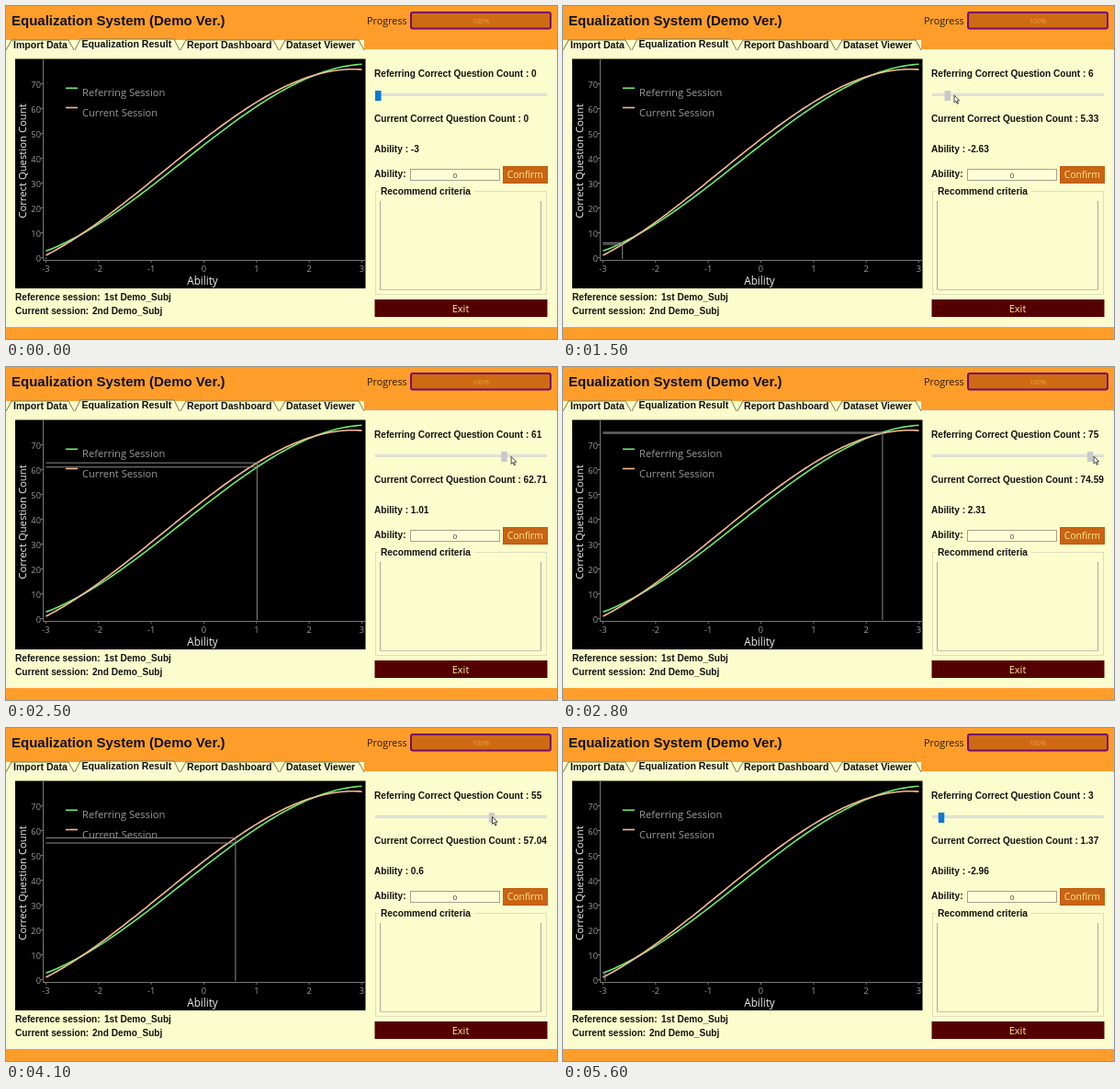
Animation, 600 px wide and 362 px high, one loop 5.7 s. Source, as an HTML page with a canvas:

```html
<!DOCTYPE html>
<html lang="en">
<head>
<meta charset="utf-8">
<title>Equalization System</title>
<style>
html, body { margin: 0; width: 100%; height: 100%; overflow: hidden; background: #fcfecb; }
canvas { display: block; }
</style>
</head>
<body>
<canvas id="stage" width="600" height="362"></canvas>
<script>
const ctx = document.getElementById('stage').getContext('2d');
const LOOP = 5700, STEP = 100;
const CREAM = '#fbfdcd', ORANGE = '#ff9d2b', GREEN = '#6cec6c', PEACH = '#f7bc92';
const bold = size => `bold ${size}px "Liberation Sans", Arial, sans-serif`;
const ui = size => `${size}px "Open Sans", "Noto Sans", sans-serif`;

// time, question count, pointer x, pointer y
const DRAG = [
  [1200, 0, 406, 97], [1500, 6, 426, 97], [2100, 43, 513, 98],
  [2800, 75, 578, 97], [3000, 80, 588, 96], [3600, 80, 593, 94],
  [3700, 80, 589, 94], [4500, 30, 470, 99], [5500, 3, 410, 99]
];

const cubic = (a, b, c, d) => x => a + x * (b + x * (c + x * d));
const referring = cubic(45.3206, 16.5084, -0.5639, -0.4418);
const current = cubic(47.6924, 16.36533, -1.041935, -0.433578);
const px = ability => 215.5 + 57.33 * ability;
const py = count => 273.5 - 2.7 * count;
const round2 = x => Math.round(x * 100) / 100;

function abilityFor(count) {
  let lo = -3, hi = 3;
  for (let i = 0; i < 30; i++) {
    const mid = (lo + hi) / 2;
    if (referring(mid) < count) lo = mid; else hi = mid;
  }
  return round2(lo);
}

function dragAt(t) {
  const last = DRAG.length - 1;
  if (t < DRAG[0][0]) return [0, 0, 0];
  if (t >= DRAG[last][0]) return DRAG[last].slice(1);
  const i = DRAG.findIndex(k => k[0] > t);
  const [a, b] = [DRAG[i - 1], DRAG[i]];
  const p = (t - a[0]) / (b[0] - a[0]);
  return [1, 2, 3].map(j => a[j] + (b[j] - a[j]) * p);
}

function box(x, y, w, h, fill, stroke, weight = 1) {
  if (fill) { ctx.fillStyle = fill; ctx.fillRect(x, y, w, h); }
  if (stroke) {
    ctx.strokeStyle = stroke;
    ctx.lineWidth = weight;
    ctx.strokeRect(x + weight / 2, y + weight / 2, w - weight, h - weight);
  }
}

function text(str, x, y, font, color = '#111', align = 'left') {
  ctx.font = font;
  ctx.fillStyle = color;
  ctx.textAlign = align;
  ctx.fillText(str, x, y);
}

function path(points, stroke, weight = 1, fill) {
  ctx.beginPath();
  points.forEach(([x, y]) => ctx.lineTo(x, y));
  if (fill) { ctx.fillStyle = fill; ctx.fill(); }
  ctx.strokeStyle = stroke;
  ctx.lineWidth = weight;
  ctx.stroke();
}

function tab(label, left, right, textX, top = 37) {
  path([[left, 48], [left + 6, top], [right - 6, top], [right, 48]], '#77774f', 1, CREAM);
  text(label, textX, top + 9, bold(10.6));
}

function drawWindow() {
  box(0, 0, 600, 362, CREAM);
  box(0, 0, 600, 48, ORANGE);
  box(0, 349, 600, 13, ORANGE);
  box(1, 47, 598, 302, null, '#f3f3e6', 1.5);
  text('Equalization System (Demo Ver.)', 6, 21, bold(15));
  text('Progress', 393, 20, ui(10.8), '#2a1a08');
  ctx.beginPath();
  ctx.roundRect(441, 7, 152, 17.5, 2);
  ctx.fillStyle = '#cf6a14';
  ctx.fill();
  ctx.strokeStyle = '#760d68';
  ctx.lineWidth = 2;
  ctx.stroke();
  text('100%', 517, 18.5, ui(7.1), '#e8a83c', 'center');

  box(0, 37, 390, 11, CREAM);
  tab('Import Data', 0, 74, 8);
  tab('Equalization Result', 75, 189, 82.5, 36);
  tab('Report Dashboard', 190, 297, 197);
  tab('Dataset Viewer', 298, 390, 305);

  text('Reference session:', 10, 320, bold(10.1));
  text('1st Demo_Subj', 107, 320, bold(10.1));
  text('Current session:', 10, 335, bold(10.1));
  text('2nd Demo_Subj', 94, 335, bold(10.1));

  text('Ability:', 401, 186, bold(10.2));
  box(440, 177, 98, 13, '#fdfed6', '#a2a290');
  text('0', 489, 186.5, ui(8), '#333', 'center');
  box(541, 174, 49, 19, '#c86414', '#bd5c10');
  text('Confirm', 565.3, 187, ui(10.4), '#ffe98c', 'center');

  box(402, 201, 187, 113, null, '#dedebc');
  box(406, 199, 104, 5, CREAM);
  text('Recommend criteria', 408, 205, bold(10.2));
  path([[407.5, 212], [407.5, 308.5]], '#aaaa98');
  path([[582.5, 212], [582.5, 308.5]], '#aaaa98');
  path([[407.5, 308.5], [582.5, 308.5]], '#c4c4ae');
  box(401.5, 319, 188, 19, '#550000');
  text('Exit', 495, 332.5, ui(11), '#ffee90', 'center');
}

function drawCurve(f, color) {
  const points = [];
  for (let i = 0; i <= 100; i++) {
    const a = -3 + i * 0.06;
    points.push([px(a), py(f(a))]);
  }
  path(points, color, 1.6);
}

function drawGuides(count, ability, matched) {
  const x = px(ability), guide = '#8c8c8c';
  ctx.save();
  ctx.beginPath();
  ctx.rect(41, 58, 350, 218);
  ctx.clip();
  for (const n of [count, matched]) path([[px(-3), py(n)], [x, py(n)]], guide);
  path([[x, py(Math.max(count, matched))], [x, 275]], guide);
  ctx.restore();
}

function drawPlot(count, ability, matched) {
  const axis = '#777', label = '#9a9a9a';
  box(10, 57.5, 381.5, 249.5, '#000');
  path([[40.5, 58], [40.5, 276.5], [391, 276.5]], axis);
  for (let n = 0; n <= 70; n += 10) {
    path([[38, py(n)], [41, py(n)]], axis);
    text(n, 38, py(n) + 4.5, ui(9.3), label, 'right');
  }
  for (let a = -3; a <= 3; a++) {
    path([[px(a), 276], [px(a), 279]], axis);
    text(a, px(a), 289, ui(9.3), label, 'center');
  }
  text('Ability', 214, 303.4, ui(11.7), '#eee', 'center');
  ctx.save();
  ctx.translate(22.2, 168.5);
  ctx.rotate(-Math.PI / 2);
  text('Correct Question Count', 0, 0, ui(11.3), '#eee', 'center');
  ctx.restore();

  drawCurve(referring, GREEN);
  drawCurve(current, PEACH);
  [['Referring Session', 89.3, GREEN], ['Current Session', 110.5, PEACH]].forEach(([name, y, color]) => {
    path([[65, y], [78, y]], color, 1.6);
    text(name, 83, y + 9, ui(11.15), label);
  });
  drawGuides(count, ability, matched);
}

function drawPointer(x, y) {
  const shape = [[0, 0], [0, 8], [1.9, 6.3], [3.2, 9.4], [4.5, 8.8], [3.2, 5.9], [5.6, 5.8], [0, 0]];
  path(shape.map(([dx, dy]) => [x + dx, y + dy]), '#333', 0.9, '#fff');
}

function draw(t) {
  const [value, pointerX, pointerY] = dragAt(t);
  const count = Math.round(value);
  const ability = abilityFor(count);
  const matched = count === 0 || count === 80 ? count : round2(current(ability));
  const pressed = t >= DRAG[0][0] && t < DRAG[DRAG.length - 1][0];

  drawWindow();
  drawPlot(count, ability, matched);
  text(`Referring Correct Question Count : ${count}`, 401, 76.5, bold(10.1));
  text(`Current Correct Question Count : ${matched}`, 401, 125.5, bold(10.1));
  text(`Ability : ${ability}`, 401, 159, bold(10.1));
  box(402, 95, 187, 3, '#e5e6dc', '#d9dbd0');
  box(402 + 2.25 * count, 92, 6.5, 11, pressed ? '#c9c9c9' : '#0a78d7');
  if (pressed) drawPointer(pointerX, pointerY);
}

function tick() {
  const t = performance.now() % LOOP;
  draw(Math.floor(t / STEP) * STEP);
  requestAnimationFrame(tick);
}
tick();
</script>
</body>
</html>
```
